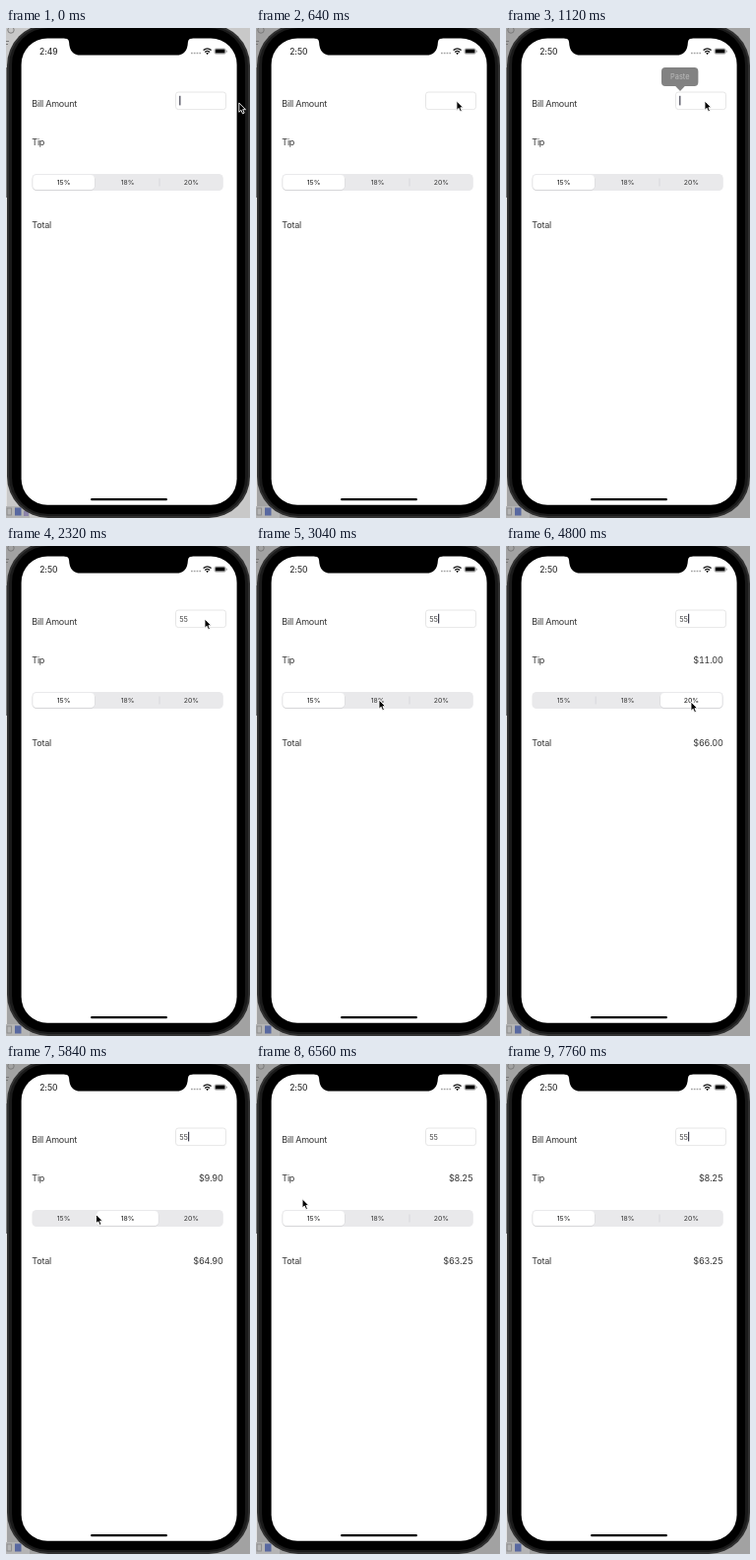
Write an HTML page that moves like this. It is 248 px wide and 497 px high and loops after 7840 ms.

```html
<!DOCTYPE html>
<html lang="en">
<head>
<meta charset="utf-8">
<title>Tip calculator</title>
<style>
  html, body { margin: 0; width: 100%; height: 100%; overflow: hidden; background: #a2a2a2; }
  svg { display: block; width: 248px; height: 497px; }
  text { font-family: Inter, "Liberation Sans", sans-serif; fill: #333; }
  .label { font-size: 9.03px; letter-spacing: -.22px; }
  .end { text-anchor: end; font-variant-numeric: tabular-nums; }
  .seg { font-size: 6.8px; text-anchor: middle; }
  .small { font-size: 7.4px; }
  .clock { font-size: 8.5px; font-weight: 500; text-anchor: middle; letter-spacing: -.05px; }
</style>
</head>
<body>
<svg viewBox="0 0 248 497">
  <rect id="desk" width="248" height="497" fill="#a2a2a2"/>
  <!-- window behind the phone -->
  <circle cx="5" cy="2" r="3.2" fill="none" stroke="#777" stroke-width=".9"/>
  <path d="M0 13.5H3M0 16.5H2" stroke="#777"/>
  <rect y="40" width="1" height="132" fill="#777"/>
  <rect y="172" width="1" height="313" fill="#e2e2e2"/>
  <rect y="485" width="24" height="12" fill="#b4b4b4"/>
  <rect x="1" y="487" width="4.5" height="7" fill="none" stroke="#858585" stroke-width=".8"/>
  <rect x="9" y="486.5" width="6.5" height="8" fill="#5868a0"/>
  <rect id="extra" x="18" y="490" width="5" height="5" fill="#8c83a8"/>

  <!-- phone -->
  <rect x="1" y="-4" width="247" height="501" rx="42" fill="#303030"/>
  <rect x="3" y="-2" width="243" height="497" rx="40" fill="#1a1a1a"/>
  <rect x="6" y="0" width="237" height="493" rx="37" fill="#000"/>
  <rect x="15.6" y="10.4" width="219" height="473.4" rx="26.5" fill="#fff"/>
  <path d="M59.5 9.5V10.4Q63.8 10.4 64.1 14.4C64.5 23 68.3 27.5 76 27.5H173C180.7 27.5 184.5 23 184.9 14.4Q185.2 10.4 189.5 10.4V9.5Z"/>
  <rect x="86" y="477" width="78" height="2.3" rx="1.15"/>

  <!-- status bar -->
  <text id="clock" class="clock" x="43.3" y="26.8"></text>
  <path d="M188 25.5H198" stroke="#a2a2a2" stroke-width="1.4" stroke-dasharray="1.7 1.1"/>
  <path d="M200.6 22.6Q204.6 19.2 208.6 22.6M202.2 24.4Q204.6 22.4 207 24.4" fill="none" stroke="#111" stroke-width="1.3"/>
  <path d="M203.2 25.4Q204.6 24.4 206 25.4L204.6 26.9Z"/>
  <rect x="211.9" y="20.9" width="11.4" height="5.4" rx="1.6" fill="none" stroke="#888" stroke-width=".6"/>
  <rect x="212.7" y="21.6" width="9.8" height="4" rx=".9"/>
  <path d="M224.3 22.7V24.6" stroke="#888" stroke-width=".8"/>

  <!-- form -->
  <text class="label" x="26.3" y="80">Bill Amount</text>
  <text class="label" x="26.3" y="119.2">Tip</text>
  <text class="label" x="26.3" y="203.2">Total</text>
  <text id="tip" class="label end" x="220.6" y="119.2"></text>
  <text id="total" class="label end" x="220.6" y="203.2"></text>
  <rect x="172.5" y="65" width="51" height="17.6" rx="2.8" fill="#fff" stroke="#e0e0e0" stroke-width=".8"/>
  <text id="bill" class="small" x="176.2" y="76.6" style="fill:#4a4a4a"></text>
  <rect id="caret" y="68.8" width="1.2" height="9.6" fill="#404050"/>

  <rect x="26.4" y="148" width="194.4" height="17" rx="4.6" fill="#e9e9eb"/>
  <path id="div1" d="M91.2 152.5V160.5" stroke="#d2d2d6" stroke-width=".7"/>
  <path id="div2" d="M156 152.5V160.5" stroke="#d2d2d6" stroke-width=".7"/>
  <g id="thumb">
    <rect x="26.8" y="149.2" width="63.6" height="15.6" rx="4.2" fill="#cfcfd2"/>
    <rect x="27.2" y="149" width="62.8" height="15" rx="3.8" fill="#fff"/>
  </g>
  <g id="names">
    <text class="seg" x="58.6" y="159">15%</text>
    <text class="seg" x="123.6" y="159">18%</text>
    <text class="seg" x="188.4" y="159">20%</text>
  </g>

  <g id="paste">
    <rect x="158" y="40" width="37.4" height="19" rx="4" fill="#828282"/>
    <path d="M172 58.8H182L177 64Z" fill="#828282"/>
    <text class="small" x="176.8" y="52.2" text-anchor="middle" style="fill:#bdbdbd">Paste</text>
  </g>

  <path id="arrow" d="M0 0V9.3L2.2 7.3L3.7 10.9L5.4 10.1L3.9 6.7H6.7Z" stroke="#fff" stroke-width=".9" stroke-linejoin="round"/>
</svg>
<script>
const LOOP = 7840, STEP = 80;
const $ = id => document.getElementById(id);

// time, x, y of the pointer tip
const path = [
  [0, 236.8, 76], [160, 236.8, 76], [720, 202, 74], [2480, 202, 74],
  [3040, 125, 156], [3440, 125, 156], [3920, 189.5, 155], [4160, 188, 158],
  [4880, 188, 158], [5280, 124, 155], [5600, 122, 154], [5840, 91.5, 152.5],
  [6080, 60, 156], [6480, 58, 155], [6800, -12, 38]
];
// time, segment, rate in percent
const picks = [[0, 0, 0], [3200, 1, 18], [4320, 2, 20], [5440, 1, 18], [6240, 0, 15]];

const ease = p => p * p * (3 - 2 * p);
const last = (rows, t) => rows.reduce((n, r, i) => r[0] <= t ? i : n, 0);
const show = (id, on) => $(id).setAttribute("visibility", on ? "visible" : "hidden");
const money = v => "$" + v.toFixed(2);

function pointer(t) {
  const i = last(path, t), a = path[i], b = path[i + 1];
  if (!b) return [a[1], a[2]];
  const p = ease((t - a[0]) / (b[0] - a[0]));
  return [a[1] + (b[1] - a[1]) * p, a[2] + (b[2] - a[2]) * p];
}

function draw(t) {
  const i = last(picks, t), [at, seg, rate] = picks[i];
  const from = i ? picks[i - 1][1] : 0;
  const slot = from + (seg - from) * ease(Math.min(1, (t - at) / 240));
  const typed = t < 1760 ? "" : t < 2000 ? "5" : "55";
  const phase = t % 1000;

  $("desk").setAttribute("fill", t < 160 ? "#c8c8c8" : "#a2a2a2");
  show("extra", t < 160);
  $("clock").textContent = t < 400 ? "2:49" : "2:50";
  $("bill").textContent = typed;
  $("caret").setAttribute("x", 176.2 + typed.length * 4.4);
  show("caret", phase < 200 || phase >= 700);
  show("paste", t >= 800 && t < 1680);

  $("thumb").setAttribute("transform", `translate(${slot * 64.9} 0)`);
  show("div1", slot > 1.5);
  show("div2", slot < .5);
  [...$("names").children].forEach((n, k) => n.style.fontWeight = k === seg ? 500 : 400);
  $("tip").textContent = rate ? money(55 * rate / 100) : "";
  $("total").textContent = rate ? money(55 + 55 * rate / 100) : "";

  const [x, y] = pointer(t);
  $("arrow").setAttribute("transform", `translate(${x} ${y})`);
}

const start = performance.now();
function tick() {
  const t = (performance.now() - start) % LOOP;
  draw(Math.floor(t / STEP) * STEP);
  requestAnimationFrame(tick);
}
draw(0);
requestAnimationFrame(tick);
</script>
</body>
</html>
```
